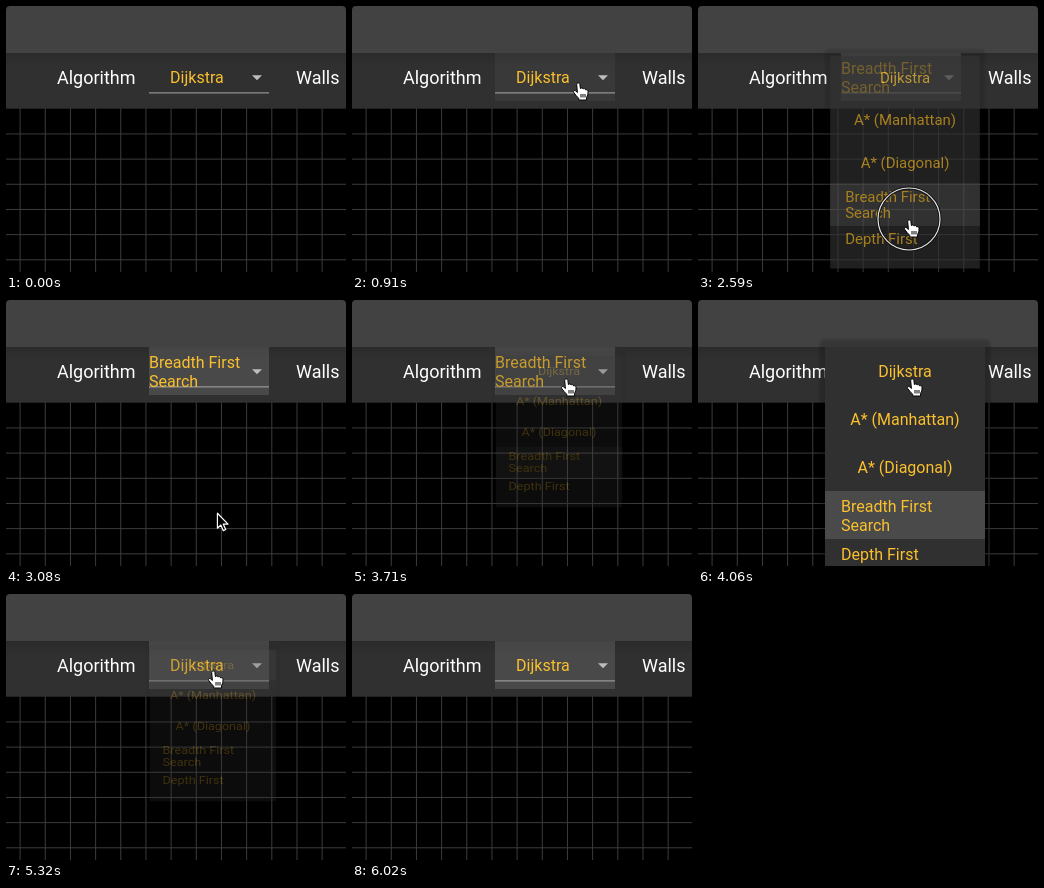
An HTML page that plays this animation: 340x266 px, repeating every 6.23 s.

```html
<!DOCTYPE html>
<html lang="en">
<head>
<meta charset="utf-8">
<title>Algorithm select</title>
<style>
  html, body { margin: 0; width: 100%; height: 100%; overflow: hidden; background: #000; }
  svg { display: block; width: 100vw; height: 100vh; }
  text { font-family: Roboto, sans-serif; font-size: 16px; fill: #fbc02d; }
  .label { font-size: 18px; fill: #fff; }
  .mid { text-anchor: middle; }
</style>
</head>
<body>
<svg viewBox="0 0 340 266">
  <defs>
    <linearGradient id="barFill" x1="0" y1="0" x2="0" y2="1">
      <stop offset="0" stop-color="#2b2b2b"/>
      <stop offset=".25" stop-color="#303030"/>
      <stop offset="1" stop-color="#303030"/>
    </linearGradient>
    <filter id="soft" x="-10%" y="-10%" width="120%" height="120%">
      <feGaussianBlur stdDeviation="1"/>
    </filter>
  </defs>
  <rect width="340" height="266"/>
  <path id="grid" stroke="#3c3c3c" fill="none"/>
  <path d="M0 47V4Q0 0 4 0H336Q340 0 340 4V47Z" fill="#424242"/>
  <rect y="47" width="340" height="55.7" fill="url(#barFill)"/>
  <text class="label" x="51" y="77.9">Algorithm</text>
  <text class="label" x="290" y="77.9">Walls</text>

  <rect id="field" x="143" y="47" width="120" height="48" fill="#fff"/>
  <path d="M143 86.9H263" stroke="#a8a8a8"/>
  <path d="M246 69.2H256L251 74.2Z" fill="#bdbdbd"/>
  <g id="short"><text class="mid" x="190.9" y="77.3">Dijkstra</text></g>
  <g id="long">
    <text x="143" y="67.6">Breadth First</text>
    <text x="143" y="86.6">Search</text>
  </g>

  <g id="menu">
    <rect x="121.5" y="39.5" width="171" height="250" rx="5" opacity=".17" filter="url(#soft)"/>
    <rect x="127" y="47" width="160" height="240" fill="#303030"/>
    <rect id="hover" x="127" width="160" height="48" fill="#3a3a3a"/>
    <rect id="picked" x="127" width="160" height="48" fill="#4a4a4a"/>
    <text class="mid" x="207" y="77.3">Dijkstra</text>
    <text class="mid" x="207" y="125.3">A* (Manhattan)</text>
    <text class="mid" x="207" y="173.3">A* (Diagonal)</text>
    <text x="143" y="211.6">Breadth First</text>
    <text x="143" y="230.6">Search</text>
    <text x="143" y="259.6">Depth First</text>
  </g>

  <g id="pointer">
    <g id="ring" fill="none">
      <circle r="31" stroke="#111" stroke-width="3"/>
      <circle r="31" stroke="#e4e4e4" stroke-width="1.2"/>
    </g>
    <g transform="translate(.4 1)">
      <path id="hand" fill="#fff" stroke="#000" stroke-linejoin="round"
        d="M-1.7 1.5C-1.7-.4 1.3-.6 1.5 1.4L2 5.6C2.6 4.5 4.5 4.8 4.7 6C5.4 5.2 7.1 5.6 7.3 6.9C8.2 6.3 9.6 7 9.6 8.4C9.7 11 9.2 12.6 8.2 14.3V17H.3V15.3C-1.5 13.7-3.1 11.5-4.6 9.6C-5.7 8-4 6.8-2.7 7.9L-1 9.5Z
           M2.6 11V14.5M4.6 11V14.5M6.6 11V14.5"/>
      <path id="arrow" stroke="#fff" stroke-width="1.2" stroke-linejoin="round"
        d="M0 0V15L3.4 11.8L5.9 17.4L8.3 16.3L5.9 10.9H10.6Z"/>
    </g>
  </g>
</svg>
<script>
const LOOP = 6230, STEP = 70;
const el = id => document.getElementById(id);
const set = (id, name, value) => el(id).setAttribute(name, value);
const show = (id, on) => set(id, 'visibility', on ? 'visible' : 'hidden');
const within = (t, a, b) => t >= a && t < b;
const ramp = (t, a, b) => Math.min(1, Math.max(0, (t - a) / (b - a)));
const smooth = k => k * k * (3 - 2 * k);
const easeOut = k => 1 - (1 - k) ** 3;
const easeIn = k => k ** 1.6;

// start, end, target x, target y, easing
const moves = [
  [140, 490, 228, 81, easeOut],
  [560, 700, 227, 77, smooth],
  [840, 910, 226, 76, smooth],
  [1385, 2100, 211, 213, smooth],
  [3060, 3520, 214, 78, smooth],
  [4220, 4520, 232, 210, smooth],
  [4520, 4830, 207, 76, smooth],
  [5600, 6020, 176, 275, easeIn]
];
const clicks = [980, 2520, 3570, 5110];

function pointerAt(t) {
  let x = 222, y = -20;
  for (const [a, b, toX, toY, ease] of moves) {
    const k = ease(ramp(t, a, b));
    x += (toX - x) * k;
    y += (toY - y) * k;
  }
  return [x, y];
}

function menuAt(t) {
  const first = ramp(t, 1050, 1330) - ramp(t, 2520, 2730);
  const second = ramp(t, 3640, 3920) - ramp(t, 5110, 5390);
  return first + second;
}

function hoverRow(t) {
  if (within(t, 1960, 2730)) return 3;
  if (within(t, 4760, 5390)) return 0;
  return -1;
}

function draw(t) {
  const [x, y] = pointerAt(t);
  const open = menuAt(t);
  const chosen = within(t, 2590, 5180) ? 3 : 0;
  const row = hoverRow(t);

  show('short', chosen === 0);
  show('long', chosen === 3);
  set('field', 'opacity', t >= 1120 ? .12 : within(t, 350, 1120) ? .045 : 0);

  const grow = smooth(open);
  const sx = .75 + .25 * grow, sy = .5625 + .4375 * grow;
  show('menu', open > 0);
  set('menu', 'opacity', open);
  set('menu', 'transform', `translate(207 71) scale(${sx} ${sy}) translate(-207 -71)`);
  set('picked', 'y', 47 + 48 * chosen);
  set('hover', 'y', 47 + 48 * row);
  show('hover', open > 0 && row >= 0);

  const overLink = within(y, 47, 95) || open > .01;
  show('hand', overLink);
  show('arrow', !overLink);
  show('ring', clicks.some(c => within(t, c, c + 140)));
  show('pointer', within(t, 210, 6020));
  set('pointer', 'transform', `translate(${x.toFixed(2)} ${y.toFixed(2)})`);
}

function buildGrid() {
  const gap = 25.17;
  let d = '';
  for (let x = 14.1; x < 340; x += gap) d += `M${x.toFixed(2)} 102V266`;
  for (let y = 127.95; y < 266; y += gap) d += `M0 ${y.toFixed(2)}H340`;
  set('grid', 'd', d);
}

function tick() {
  const t = performance.now() % LOOP;
  draw(Math.floor(t / STEP) * STEP);
  requestAnimationFrame(tick);
}

buildGrid();
tick();
</script>
</body>
</html>
```
